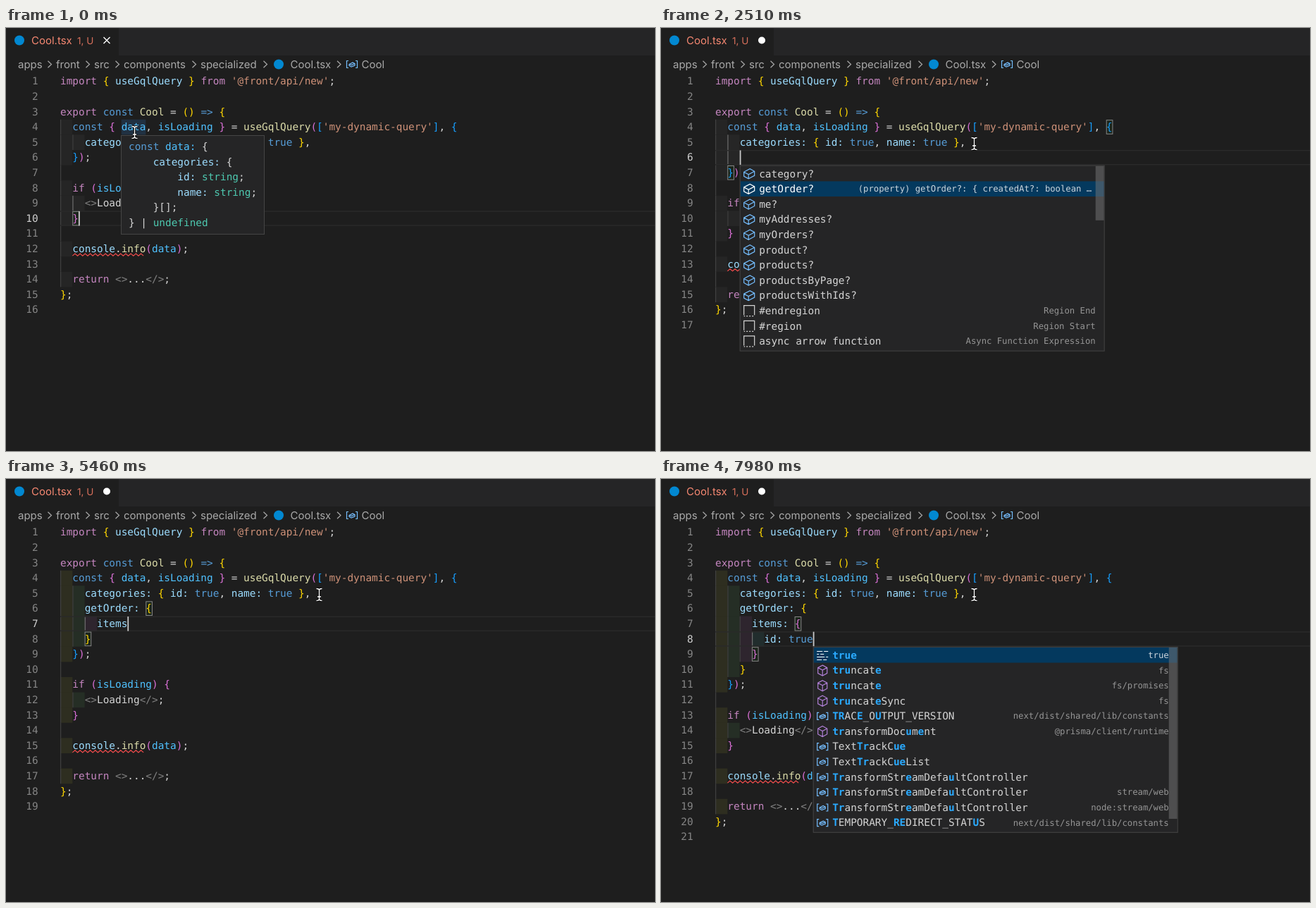
Recreate the animation shown at these times as an HTML page with a canvas. Size 921 by 600 pixels, loop 8000 ms.

```html
<!DOCTYPE html>
<html lang="en">
<head>
<meta charset="utf-8">
<title>Typed query editor</title>
<style>
  html, body { margin: 0; width: 921px; height: 600px; overflow: hidden; background: #1e1e1e; }
  canvas { display: block; }
</style>
</head>
<body>
<canvas id="stage" width="921" height="600"></canvas>
<script>
const ctx = document.getElementById('stage').getContext('2d');
const LOOP = 8000, LEFT = 77, TOP = 65, ROW = 21.6, CHAR = 8.669;
const MONO = '"DejaVu Sans Mono", monospace', UI = 'Inter, sans-serif';
const CODE = '14.4px ' + MONO, BOLD = 'bold ' + CODE, SMALL = '12.24px ' + MONO;
const PLAIN = '#d4d4d4', BLUE = '#75beff', REACT = '#0288d1';
const BRACKETS = ['#ffd700', '#da70d6', '#179fff'];

const hues = {};
for (const [color, words] of [
  ['#c586c0', 'import export from if return'],
  ['#569cd6', 'const true =>'],
  ['#4fc1ff', 'data isLoading'],
  ['#dcdcaa', 'Cool'],
  ['#4ec9b0', 'string undefined'],
  ['#808080', '<> </>'],
  [PLAIN, 'Loading'],
]) for (const word of words.split(' ')) hues[word] = color;

const head = `import { useGqlQuery } from '@front/api/new';

export const Cool = () => {
  const { data, isLoading } = useGqlQuery(['my-dynamic-query'], {
    categories: { id: true, name: true },`.split('\n');
const tail = `  });

  if (isLoading) {
    <>Loading</>;
  }

  console.info(data);

  return <>...</>;
};
`.split('\n');
const hover = `const data: {
    categories: {
        id: string;
        name: string;
    }[];
} | undefined`.split('\n');

// Suggestion rows: [icon, label, detail]; asterisks enclose matched letters.
const field = (name, type = 'boolean | undefined') =>
  ['field', name + '?', `(property) ${name}?: ${type}`];
const snippets = [
  ['#endregion', 'Region End'], ['#region', 'Region Start'],
  ['async arrow function', 'Async Function Expression'],
  ['async function', 'Async Function Statement'], ['class', 'Class Definition'],
  ['ctor', 'Constructor'], ['dowhile', 'Do-While Statement'],
  ['error', 'Log error to console'], ['for', 'For Loop'],
].map(row => ['snippet', ...row]);
const menu = (thumb, ...rows) => ({ thumb, rows: [...rows, ...snippets].slice(0, 12) });
const queryMenu = menu(77,
  field('category', '{ id?: boolean | undefi …'),
  field('getOrder', '{ createdAt?: boolean …'),
  field('me', '{ email?: boolean | undefined …'),
  ...['myAddresses', 'myOrders', 'product', 'products', 'productsByPage', 'productsWithIds'].map(n => field(n)));
const orderMenu = menu(89, field('createdAt'), field('creditCard'), field('items', '{ id?: boolean | undef …'));
const itemMenu = menu(87, ...['id', 'price', 'product', 'quantity'].map(n => field(n)));
const stream = '*Tr*ansformStr*e*amDefa*u*ltController', constants = 'next/dist/shared/lib/constants';
const valueMenu = menu(243,
  ['keyword', '*true*', 'true'],
  ['method', '*tru*ncat*e*', 'fs'],
  ['method', '*tru*ncat*e*', 'fs/promises'],
  ['method', '*tru*ncat*e*Sync', 'fs'],
  ['variable', '*TR*AC*E*_O*U*TPUT_VERSION', constants],
  ['method', '*tr*ansformDoc*u*m*e*nt', '@prisma/client/runtime'],
  ['variable', 'Text*Tr*ackC*ue*', ''],
  ['variable', 'Text*Tr*ackC*ue*List', ''],
  ['variable', stream, ''],
  ['variable', stream, 'stream/web'],
  ['variable', stream, 'node:stream/web'],
  ['variable', '*T*EMPORARY_*RE*DIRECT_STAT*U*S', constants]);

const order = (...lines) => ['    getOrder: {', ...lines, '    }'];
const items = text => order('      items: {', '        ' + text, '      }');
const blank = ['    '], inOrder = order('      ');

// [start, inserted lines, cursor row, menu, selected row]
const steps = [
  [0, [], 9], [1040, [], 4], [1190, blank, 5],
  [1630, blank, 5, queryMenu, 0], [2070, blank, 5, queryMenu, 1],
  [2220, blank, 5, queryMenu, 2], [2510, blank, 5, queryMenu, 1],
  [2810, ['    getOrder'], 5], [3100, ['    getOrder:'], 5],
  [3250, ['    getOrder: '], 5], [3400, ['    getOrder: {}'], 5],
  [3680, inOrder, 6], [4130, inOrder, 6, orderMenu, 0],
  [5020, inOrder, 6, orderMenu, 1], [5170, inOrder, 6, orderMenu, 2],
  [5460, order('      items'), 6], [5610, order('      items:'), 6],
  [5760, order('      items: '), 6], [5900, order('      items: {}'), 6],
  [6200, items(''), 7], [6500, items(''), 7, itemMenu, 0],
  [7240, items('id'), 7], [7390, items('id:'), 7], [7540, items('id: '), 7],
  [7680, items('id: t'), 7], [7830, items('id: tru'), 7],
  [7980, items('id: true'), 7, valueMenu, 0],
];
const cursorOff = [[590, 1040], [1630, 1770], [2070, 2220], [4280, 4580], [5020, 5170], [6650, 7240]];

const icons = {
  field: 'M.5 5.5L9 1L15.5 4.5V10.5L7 15L.5 11.5ZM.5 5.5L7 9L15.5 4.5M7 9V15',
  method: 'M8 .5L14.5 4V12L8 15.5L1.5 12V4ZM1.5 4L8 7.5L14.5 4M8 7.5V15.5',
  variable: 'M3 3H.5V13H3M13 3H15.5V13H13M4 8L9 5.5L12 7V9.5L7 11.5L4 10ZM4 8L7 9L12 7',
  keyword: 'M0 2.5H8M10 2.5H16M0 6.5H3M5 6.5H10M0 10.5H11M13 10.5H16M0 14.5H7M9 14.5H14',
  snippet: 'M.5 14V.5H15.5V14M.5 15.5H2M4 15.5H6M8 15.5H10M12 15.5H14',
};
for (const name in icons) icons[name] = new Path2D(icons[name]);
const iconColors = { field: BLUE, variable: BLUE, method: '#b180d7', keyword: PLAIN, snippet: PLAIN };

const colX = col => LEFT + col * CHAR;
const rowY = row => TOP + row * ROW;
const indentOf = line => line.search(/\S|$/);

function rect(x, y, w, h, color) {
  ctx.fillStyle = color;
  ctx.fillRect(x, y, w, h);
}
function frame(x, y, w, h, color) {
  ctx.strokeStyle = color;
  ctx.lineWidth = 1;
  ctx.strokeRect(x, y, w, h);
}
function text(str, x, y, color, font = CODE, align = 'left') {
  ctx.font = font;
  ctx.fillStyle = color;
  ctx.textAlign = align;
  ctx.fillText(str, x, y);
}
function stroke(path, x, y, color, width = 1.2) {
  ctx.save();
  ctx.translate(x, y);
  ctx.strokeStyle = color;
  ctx.lineWidth = width;
  ctx.stroke(path instanceof Path2D ? path : new Path2D(path));
  ctx.restore();
}
function dot(x, y, r, color) {
  ctx.fillStyle = color;
  ctx.beginPath();
  ctx.arc(x, y, r, 0, 7);
  ctx.fill();
}

function tokenize(line) {
  return [...line.matchAll(/'[^']*'|<\/?>|=>|\w+:?|\S/g)].map(({ 0: word, index }) => {
    let color = hues[word.replace(':', '')] || (/\w/.test(word) ? '#9cdcfe' : PLAIN);
    if (word[0] === "'") color = '#ce9178';
    else if (/\w/.test(word) && line[index + word.length] === '(') color = '#dcdcaa';
    return { word, index, color };
  });
}
function drawTokens(tokens, x, y) {
  for (const { word, index, color } of tokens) text(word, x + index * CHAR, y, color);
}

// Colours brackets by depth and returns the innermost pair around the cursor.
function matchBrackets(rows, row, col) {
  const stack = [], place = (r, c) => r * 1000 + c;
  let best = null;
  rows.forEach((tokens, r) => tokens.forEach(token => {
    if (/^[([{]$/.test(token.word)) {
      token.color = BRACKETS[stack.length % 3];
      stack.push({ row: r, col: token.index });
    } else if (/^[)\]}]$/.test(token.word)) {
      const open = stack.pop(), close = { row: r, col: token.index }, at = place(row, col);
      token.color = BRACKETS[stack.length % 3];
      if (place(open.row, open.col) <= at && at <= place(r, token.index + 1) &&
          (!best || place(open.row, open.col) > place(best[0].row, best[0].col))) best = [open, close];
    }
  }));
  return best;
}

function drawChrome(dirty) {
  rect(0, 0, 921, 600, '#1e1e1e');
  rect(160, 0, 761, 39, '#252526');
  dot(19, 17.5, 7, REACT);
  text('Cool.tsx', 36, 23, '#f48771', '15px ' + UI);
  text('1, U', 101, 23, '#d9705c', '13.6px ' + UI);
  if (dirty) dot(143, 17.5, 5, '#fff');
  else stroke('M-4.5 -4.5L4.5 4.5M4.5 -4.5L-4.5 4.5', 143, 17.5, '#fff', 1.4);

  const crumbs = { apps: 17, front: 71, src: 125, components: 167, specialized: 276, 'Cool.tsx': 403.5, Cool: 504.5 };
  for (const name in crumbs) text(name, crumbs[name], 57, '#a9a9a9', '15px ' + UI);
  for (const x of [59.5, 113.5, 155.5, 264.5, 365.5, 470]) stroke('M0 -4.8L5 0L0 4.8', x, 51.5, '#a9a9a9');
  dot(387, 51.5, 7, REACT);
  stroke(icons.variable, 483, 43.5, BLUE);
}

function drawEditor(lines, row, col, t) {
  const rows = lines.map(tokenize);
  const pair = matchBrackets(rows, row, col);
  const tints = [
    t < 3680 ? '#252525' : 'rgba(255,255,64,.07)',
    t < 2810 ? '#262626' : 'rgba(127,255,127,.07)',
    'rgba(255,127,255,.07)', 'rgba(79,236,236,.07)'];

  lines.forEach((line, r) => {
    const y = rowY(r), indent = indentOf(line);
    for (let c = 0; c < indent; c += 2) rect(colX(c), y, 2 * CHAR, ROW, tints[c / 2]);
    const guided = line ? indent : r > 2 && r < lines.length - 1 ? 2 : 0;
    for (let c = 0; c < guided; c += 2) {
      const active = r > pair[0].row && r < pair[1].row && c === indentOf(lines[pair[0].row]);
      rect(colX(c), y, 1.2, ROW, active ? '#707070' : '#404040');
    }
    text(r + 1, 45.7, y + 15.3, r === row ? '#d0d0d0' : '#858585', CODE, 'right');
  });

  rect(LEFT, rowY(row), 844, 1.4, '#2a2a2a');
  rect(LEFT, rowY(row) + 20, 844, 1.4, '#2a2a2a');
  for (const p of pair) {
    rect(colX(p.col), rowY(p.row), CHAR, 20.6, 'rgba(0,100,0,.1)');
    frame(colX(p.col) + .4, rowY(p.row) + .9, CHAR, 19.6, '#888');
  }
  if (t < 440) rect(colX(10), rowY(3), 4 * CHAR, ROW, 'rgba(38,79,120,.4)');
  rows.forEach((tokens, r) => drawTokens(tokens, LEFT, rowY(r) + 15.3));

  const errorRow = lines.findIndex(line => line.includes('console'));
  let wave = 'M0 3';
  for (let x = 3.6, up = true; x < 12 * CHAR; x += 3.6, up = !up) wave += `L${x} ${up ? 0 : 3}`;
  stroke(wave, colX(2), rowY(errorRow) + 17.5, '#f14c4c');

  if (!cursorOff.some(([from, to]) => t >= from && t < to)) rect(colX(col), rowY(row) + .5, 1.8, 20.6, '#c8c8c8');
}

function drawHover() {
  rect(163.5, 152.5, 203, 140, '#252526');
  frame(163.5, 152.5, 203, 140, '#454545');
  hover.forEach((line, i) => drawTokens(tokenize(line), 174, 173 + i * ROW));
}

function drawMenu({ rows, thumb }, selected, x, y) {
  rect(x, y, 517.5, 263.5, '#252526');
  rows.forEach(([icon, label, detail], i) => {
    const top = y + 1.2 + i * ROW, on = i === selected;
    if (on) rect(x + 1, top, 516, ROW, '#04395e');
    stroke(icons[icon], x + 5.5, top + 3, on ? '#fff' : iconColors[icon]);
    let col = 0;
    label.split('*').forEach((part, k) => {
      const hit = k % 2;
      text(part, x + 27.5 + col * CHAR, top + 15.8, hit ? '#2aaaff' : on ? '#fff' : PLAIN, hit ? BOLD : CODE);
      col += part.length;
    });
    if (icon !== 'field' || on) {
      const right = x + (detail.endsWith('…') ? 499.5 : 505);
      text(detail, right, top + 15, on ? '#cdd6dd' : '#959595', SMALL, 'right');
    }
  });
  rect(x + 505, y + 1.2, 12, thumb, 'rgba(121,121,121,.5)');
  frame(x + .5, y + .5, 517, 263, '#454545');
}

function drawPointer(t) {
  const p = t < 140 ? 0 : Math.min(1, (Math.floor((t - 140) / 150) + 1) / 7);
  const eased = p * p * (3 - 2 * p);
  const beam = 'M-4 -8.5Q0 -8.5 0 -6Q0 -8.5 4 -8.5M0 -6V6M-4 8.5Q0 8.5 0 6Q0 8.5 4 8.5M-2.5 3H2.5';
  const x = 182.5 + 262 * eased, y = 148 + 16 * eased;
  stroke(beam, x, y, '#000', 3.4);
  stroke(beam, x, y, '#fff', 1.4);
}

function draw(now) {
  const t = now % LOOP;
  const [, added, row, list, selected] = steps.findLast(step => step[0] <= t);
  const lines = [...head, ...added, ...tail];
  const col = lines[row].length - (lines[row].endsWith('{}') ? 1 : 0);
  ctx.textRendering = 'geometricPrecision';
  drawChrome(t >= 1190);
  drawEditor(lines, row, col, t);
  if (t < 440) drawHover();
  if (list) drawMenu(list, selected, colX(col), rowY(row + 1));
  drawPointer(t);
  requestAnimationFrame(draw);
}
requestAnimationFrame(draw);
</script>
</body>
</html>
```
